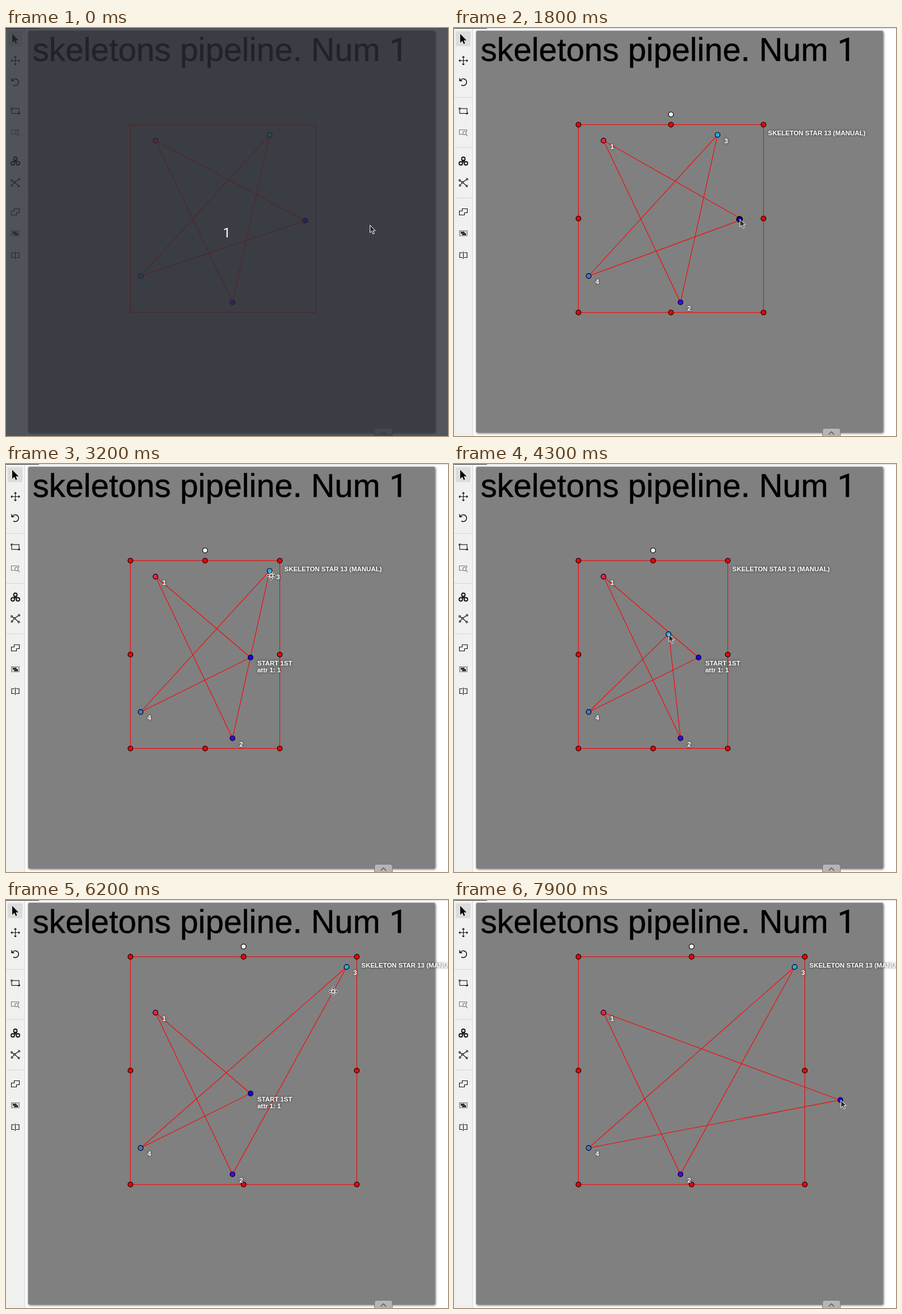
Animation, 779 px wide and 719 px high, one loop 8000 ms. Source, as an HTML page:

```html
<!DOCTYPE html>
<html lang="en">
<head>
<meta charset="utf-8">
<title>Skeleton editing</title>
<style>
  html, body { margin: 0; width: 100%; height: 100%; overflow: hidden; background: #fff; }
  svg { display: block; width: 779px; height: 719px; font-family: "Liberation Sans", Arial, sans-serif; }
  .paper { filter: drop-shadow(1px 1px 2px rgba(0, 0, 0, .65)); }
  .title { font-size: 57.7px; stroke: #000; stroke-width: .5; filter: blur(.6px); }
  .plain { font-family: Roboto, sans-serif; }
  .label { font-size: 11.45px; font-weight: bold; fill: #fff; filter: drop-shadow(0 0 2px rgba(0, 0, 0, .75)); }
  .icon { fill: none; stroke: #111; stroke-width: 1.1; }
  .wire { fill: none; stroke: #f00; stroke-width: 1.1; }
  .dot { stroke: #000; stroke-width: 1.2; }
</style>
</head>
<body>
<svg viewBox="0 0 779 719">
  <rect width="779" height="719" fill="#fff"/>
  <rect class="paper" x="39" y="5" width="717" height="708" rx="2" fill="#808080"/>
  <text class="title" x="47" y="58">skeletons pipeline. Num <tspan class="plain">1</tspan></text>

  <rect width="34" height="719" fill="#f0f0ef"/>
  <path d="M33.5 0V719M0 122.5H33M0 210.5H33M0 299.5H33" stroke="#d8d8d8"/>
  <path d="M0 .5H779" stroke="#d4d4d4"/>
  <path d="M0 .5H58" stroke="#222"/>
  <rect x="3" y="6" width="26" height="26" rx="1" fill="#dcdcda"/>
  <path d="M11 10.5V26L14.7 22.6L17.2 28L19.4 27L17 21.7H22Z"/>
  <g class="icon">
    <path d="M16.5 50V65M9 57.5H24M14.5 52L16.5 50L18.5 52M14.5 63L16.5 65L18.5 63M11 55.5L9 57.5L11 59.5M22 55.5L24 57.5L22 59.5"/>
    <path d="M11 92.5A6 6 0 1 1 13 100.5M10 88.5V93H14.5" stroke-width="1.5"/>
    <rect x="10" y="142" width="13" height="8.5"/>
    <path d="M9 144V141H12M21 151.5H24V148.5"/>
    <g stroke="#777">
      <path d="M15 187.5H9.5V179.5H22.5V183"/>
      <circle cx="18.5" cy="185" r="3"/>
      <path d="M20.7 187.2L24 190.5"/>
    </g>
    <g stroke-width="1.8">
      <circle cx="16.5" cy="230.5" r="3"/>
      <circle cx="12" cy="238.5" r="3"/>
      <circle cx="21" cy="238.5" r="3"/>
      <path d="M14 233L16.5 236L19 233"/>
    </g>
    <path d="M10 268.5L15 272L23 266.5M15 272L10.500 277.500M15 272L22.500 278.500"/>
    <g fill="#f0f0ef">
      <circle cx="10" cy="268.500" r="1.400"/>
      <circle cx="23" cy="266.500" r="1.400"/>
      <circle cx="15" cy="272" r="1.400"/>
      <circle cx="10.500" cy="277.500" r="1.400"/>
      <circle cx="22.500" cy="278.500" r="1.400"/>
    </g>
    <path d="M14.5 318.5H23.5V325.5H18.5V329.5H9.5V322.5H14.5Z"/>
    <rect x="10" y="357.5" width="13" height="8.5" stroke-dasharray="2 1"/>
    <path d="M12.5 359.5H18V362H20.5V364.5H15V362H12.5Z" fill="#444"/>
    <path d="M15 396H10V404.5H15M18 396H23V404.5H18M16.5 394V407"/>
  </g>
  <path d="M649.5 720V709Q649.5 705.5 653 705.5H677.5Q681 705.5 681 709V720" fill="#b5b5b5" stroke="#777"/>
  <path d="M660.5 716.5L665.2 711.5L670 716.5" fill="none" stroke="#444" stroke-width="1.1"/>

  <g id="scene"></g>
  <g id="cover">
    <rect width="779" height="719" fill="#282c34" fill-opacity=".8"/>
    <text class="plain" x="389" y="368.5" font-size="24" text-anchor="middle" fill="#fff">1</text>
  </g>
  <g id="cursor">
    <path id="arrow" d="M0 0V13.2L3 10.5L5.3 15.6L7.6 14.6L5.4 9.6H9.5Z" fill="#2b2b2b" stroke="#fff"/>
    <g id="mover" transform="translate(2 8)" stroke="#fff" fill="#333">
      <path d="M0 -8L3 -4.5H1V-1H4.5V-3L8 0L4.5 3V1H1V4.5H3L0 8L-3 4.5H-1V1H-4.5V3L-8 0L-4.5 -3V-1H-1V-4.5H-3Z" stroke-width=".8"/>
      <circle r="3.3" fill="none"/>
    </g>
  </g>
</svg>
<script>
// All times are in steps of 100 ms.
const STEP = 100, STEPS = 80, PAD = 18, LAG = .4, ACTIVE = 6;
const COLORS = ['#ff1f48', '#4600ff', '#28a9f0', '#4278cc', '#1a00ff'];
const START = [[263.5, 198.5], [399.2, 483.3], [464.5, 188.3], [237.3, 437], [527.5, 339.5]];
const CURSOR = [641.5, 347.5];

const linear = t => t;
const smooth = t => t * t * (3 - 2 * t);
const cubic = t => t < .5 ? 4 * t ** 3 : 1 - 4 * (1 - t) ** 3;

// The cursor travels to a point during `reach`, then drags it along a Bezier curve.
const DRAGS = [
  { point: 4, reach: [1, 9], from: 16, to: 24, ease: linear, curve: [[495, 333], [463, 341], [431, 341]] },
  { point: 2, reach: [25, 32], from: 33, to: 43, ease: smooth, curve: [[440, 225], [400, 270], [378, 300]] },
  { point: 2, reach: [44, 45], from: 50, to: 59, ease: linear, curve: [[649, 300], [533, 217], [600.3, 118]] },
  { point: 4, reach: [60, 68], from: 71.1, to: 79, ease: cubic, lead: .5, curve: [[514, 358], [598, 353], [681, 352.5]] },
];

const $ = id => document.getElementById(id);
const mix = (p, q, k) => p.map((v, i) => v + (q[i] - v) * k);
const progress = (s, a, b) => Math.min(1, Math.max(0, (s - a) / (b - a)));

function bezier(pts, u) {
  while (pts.length > 1) pts = pts.slice(1).map((p, i) => mix(pts[i], p, u));
  return pts[0];
}

function pointsAt(s) {
  const pts = START.slice();
  for (const d of DRAGS)
    if (s > d.from) pts[d.point] = bezier([pts[d.point], ...d.curve], d.ease(progress(s, d.from, d.to)));
  return pts;
}

function boxAt(s) {
  const done = DRAGS.filter(d => s > d.to).pop();
  const pts = pointsAt(done ? done.to : 0);
  const xs = pts.map(p => p[0]), ys = pts.map(p => p[1]);
  return [Math.min(...xs) - PAD, Math.min(...ys) - PAD, Math.max(...xs) + PAD, Math.max(...ys) + PAD];
}

function cursorAt(s) {
  let pos = CURSOR;
  for (const d of DRAGS) {
    const time = Math.min(s > d.from ? s + (d.lead || 0) : s, d.to);
    const [x, y] = pointsAt(time)[d.point];
    pos = mix(pos, [x + .8, y + .3], smooth(progress(s, ...d.reach)));
  }
  return pos;
}

const dot = (x, y, fill, bold) =>
  `<circle class="dot" cx="${x}" cy="${y}" r="4.3" fill="${fill}"${bold ? ' style="stroke-width:3"' : ''}/>`;
const label = (x, y, text) => `<text class="label" x="${x}" y="${y}">${text}</text>`;

function scene(s) {
  const drag = DRAGS.find(d => s > d.from && s <= d.to);
  const held = drag ? drag.point : -1;
  const pts = pointsAt(s), prev = pointsAt(s - 1);
  const [l, t, r, b] = boxAt(s), cx = (l + r) / 2, cy = (t + b) / 2;

  // Edges trail slightly behind the dragged point.
  const ends = pts.map((p, i) => i === held ? mix(p, prev[i], LAG) : p);
  let out = `<rect class="wire" x="${l}" y="${t}" width="${r - l}" height="${b - t}"/>`;
  out += `<polygon class="wire" points="${ends.join(' ')}"/>`;
  if (s >= ACTIVE) {
    for (const x of [l, cx, r])
      for (const y of [t, cy, b])
        if (x !== cx || y !== cy) out += dot(x, y, '#f00');
    out += dot(cx, t - PAD, '#fff');
  }
  pts.forEach(([x, y], i) => { out += dot(x, y, COLORS[i], i === 4 && s >= 12 && s <= 25); });
  if (s >= ACTIVE) {
    pts.forEach(([x, y], i) => {
      if (i === held) return;
      out += label(x + 12, y + 14.3, i === 4 ? 'START 1ST' : i + 1);
      if (i === 4) out += label(x + 12, y + 25.8, 'attr 1: 1');
    });
    out += label(r + 8, t + 18.6, 'SKELETON STAR 13 (MANUAL)');
  }
  return out;
}

function draw(s) {
  $('scene').innerHTML = scene(s);
  $('cover').style.display = s ? 'none' : '';
  $('cursor').setAttribute('transform', `translate(${cursorAt(s)})`);
  const hover = s > ACTIVE && DRAGS.some(({ reach: [a, b] }) => s > a && s <= b);
  $('mover').style.display = hover ? '' : 'none';
  $('arrow').style.display = hover ? 'none' : '';
}

let shown = -1;
function tick() {
  const s = Math.floor(performance.now() / STEP + .01) % STEPS;
  if (s !== shown) draw(shown = s);
  requestAnimationFrame(tick);
}
tick();
</script>
</body>
</html>
```
